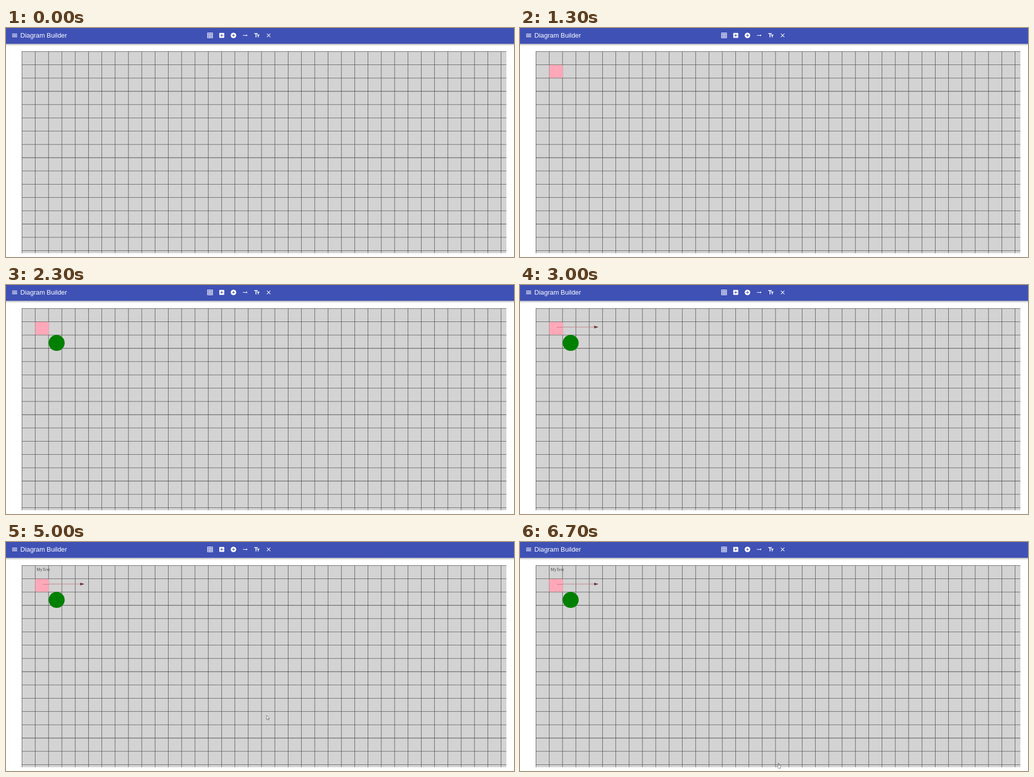
These frames come from a looping animation (1000x452 px, 6800 ms). An HTML page:

```html
<!DOCTYPE html>
<html lang="en">
<head>
<meta charset="utf-8">
<title>Diagram Builder</title>
<style>
  html, body { margin: 0; width: 100%; height: 100%; overflow: hidden; background: #fff; }
  svg { display: block; width: 1000px; height: 452px; }
  .title { font: 12.8px "Liberation Sans", Arial, sans-serif; fill: #fff; }
  .label { font: 8.4px "Liberation Serif", Times, serif; fill: #444; }
  .line { fill: none; stroke: #fff; stroke-width: 2; }
</style>
</head>
<body>
<svg viewBox="0 0 1000 452">
  <defs>
    <linearGradient id="shade" x2="0" y2="1">
      <stop offset="0" stop-color="#555b80" stop-opacity=".6"/>
      <stop offset=".45" stop-color="#666" stop-opacity=".2"/>
      <stop offset="1" stop-color="#666" stop-opacity="0"/>
    </linearGradient>
  </defs>

  <rect x="31" y="46" width="954" height="398.5" fill="#d3d3d3"/>
  <path id="grid" fill="#484848"/>

  <rect id="box" x="57.5" y="72.9" width="26.7" height="25.3" fill="#ffa8b9"/>
  <circle id="disc" cx="99.7" cy="114.3" r="15.8" fill="#008000"/>
  <g id="arrow">
    <path d="M85 83H147" stroke="#c27c80"/>
    <path d="M73 83.5H85" stroke="#704248" stroke-dasharray="1.3 1.7"/>
    <path d="M146 80.3L154.5 83L146 85.7Z" fill="#70383a"/>
  </g>
  <text id="label" class="label" x="60" y="57">MyText</text>

  <rect y="31" width="1000" height="5" fill="url(#shade)"/>
  <rect width="1000" height="31" fill="#3f51b5"/>
  <text class="title" x="28.2" y="19">Diagram Builder</text>
  <g id="icons" fill="#fff"></g>

  <g id="cursor" stroke="#555" stroke-width=".8" fill="#fff" stroke-linejoin="round">
    <path id="pointer" d="M0 0V8.4L2 6.6L3.4 9.6L4.7 9L3.3 6.2H5.8Z"/>
    <path id="hand" d="M1.2 .8Q2 -.2 2.8 .8V4.4L5.6 5Q6.4 5.2 6.3 6.2L5.6 10.6H1.8L-1.2 6.4Q-.6 5.2 1.2 6.6Z"/>
  </g>
</svg>
<script>
const LOOP = 6800, TICK = 100, CELL = 26.2;
const area = { left: 31, top: 46, right: 985, bottom: 444.5 };
const $ = id => document.getElementById(id);

function drawGrid() {
  const { left, top, right, bottom } = area, w = 0.8;
  let d = "";
  for (let x = left; x < right; x += CELL) d += `M${x} ${top}h${w}V${bottom}h${-w}Z`;
  for (let y = top; y < bottom; y += CELL) d += `M${left} ${y}H${right}v${w}H${left}Z`;
  $("grid").setAttribute("d", d);
}

const plus = "M12 7v10M7 12h10";
const line = d => `<path class="line" d="${d}"/>`;
const cutPlus = `<path d="${plus}" stroke="#3f51b5" stroke-width="2"/>`;
const icons = [
  [17, line("M3 7h18M3 12h18M3 17h18")],
  [401.7, line("M3 3h18v18H3ZM9 3v18M15 3v18M3 9h18M3 15h18")],
  [424.7, `<rect x="3" y="3" width="18" height="18" rx="2"/>${cutPlus}`],
  [447.8, `<circle cx="12" cy="12" r="10"/>${cutPlus}`],
  [470.8, line("M4 12h13") + `<path d="M16 8l4 4l-4 4Z"/>`],
  [493.8, `<path d="M2.5 4v3h5v12h3V7h5V4ZM21.5 9h-9v3h3v7h3v-7h3Z"/>`],
  [517, line("M5.7 5.7L18.3 18.3M18.3 5.7L5.7 18.3")]
];

// Times at which each item is added to the diagram.
const added = { box: 1300, disc: 2000, arrow: 2700, label: 3600, cursor: 4000 };

// Pointer path: time, x, y.
const path = [
  [4100, 432.3, 29], [4400, 492, 260], [4700, 500, 290], [5000, 513, 342],
  [5800, 513, 342], [6300, 508, 428], [6500, 508, 428], [6700, 507, 436]
];

function pointerAt(t) {
  if (t <= path[0][0]) return path[0].slice(1);
  const i = path.findIndex(p => p[0] >= t);
  if (i < 0) return path[path.length - 1].slice(1);
  const [t0, x0, y0] = path[i - 1], [t1, x1, y1] = path[i];
  const k = (t - t0) / (t1 - t0);
  return [x0 + (x1 - x0) * k, y0 + (y1 - y0) * k];
}

const show = (id, on) => $(id).setAttribute("visibility", on ? "inherit" : "hidden");

function render(now) {
  const t = Math.floor((now % LOOP) / TICK) * TICK;
  for (const id in added) show(id, t >= added[id]);
  const [x, y] = pointerAt(t);
  $("cursor").setAttribute("transform", `translate(${x} ${y})`);
  show("pointer", t < 6300);
  show("hand", t >= 6300);
}

drawGrid();
$("icons").innerHTML = icons.map(([x, shape]) =>
  `<g transform="translate(${x} 14.6) scale(.546) translate(-12 -12)">${shape}</g>`).join("");

const start = performance.now();
function frame() {
  render(performance.now() - start);
  requestAnimationFrame(frame);
}
frame();
</script>
</body>
</html>
```
